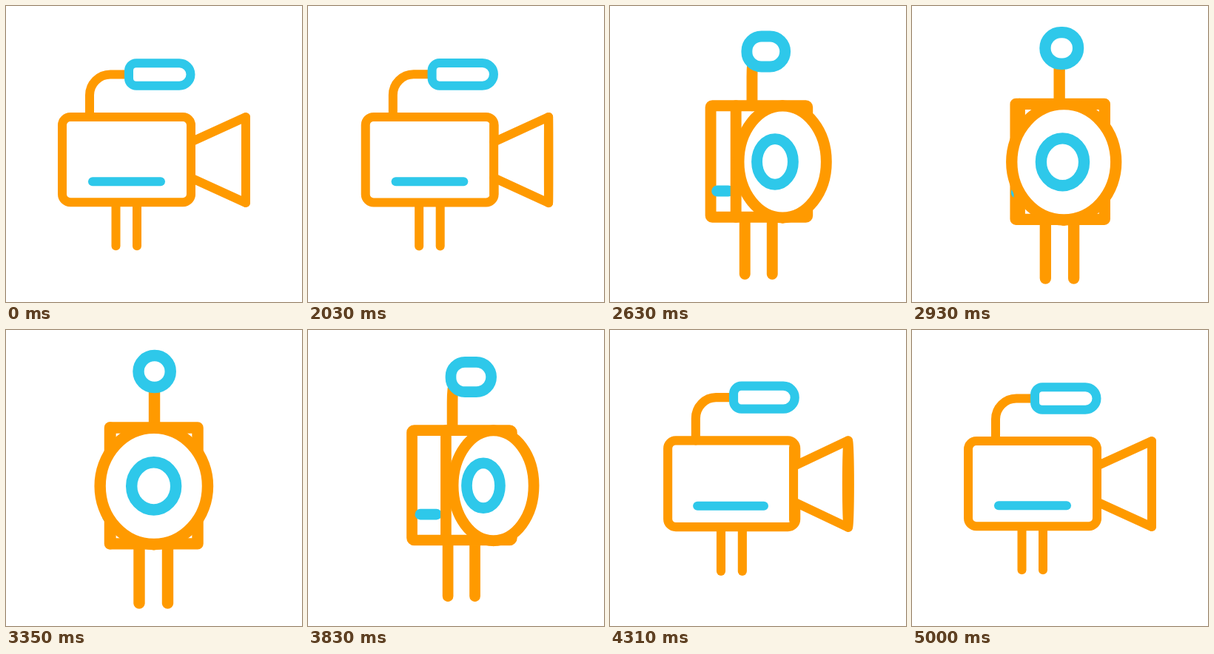
An HTML page with a canvas for the animation above (5.03 s loop, 400 px wide and 400 px high).

```html
<!DOCTYPE html>
<html lang="en">
<head>
<meta charset="utf-8">
<title>Turning camera</title>
<style>
  html, body { margin: 0; width: 100%; height: 100%; overflow: hidden; background: #fff; }
  canvas { display: block; width: 400px; height: 400px; }
</style>
</head>
<body>
<canvas id="stage" width="400" height="400"></canvas>
<script>
const ctx = document.getElementById('stage').getContext('2d');
const ORANGE = '#ff9a00', BLUE = '#2ec8ea';
const LOOP = 5030, HOLD = 2030, STEP = 30, TURN = 3350;

// Time in ms and amount of turn: 0 is the side view, 1 the front view.
const KEYS = [
  [2000, 0], [2030, 0.005], [2150, 0.13], [2250, 0.34], [2350, 0.53], [2450, 0.675],
  [2540, 0.78], [2630, 0.85], [2770, 0.928], [2920, 0.976], [3080, 0.998],
  [3220, 1.008], [3350, 1.002], [3480, 0.985], [3620, 0.93], [3730, 0.872], [3830, 0.795],
  [3950, 0.62], [4060, 0.395], [4160, 0.2], [4230, 0.105], [4310, 0.036],
  [4400, -0.018], [4520, -0.045], [4640, -0.037], [4760, -0.02], [4900, -0.005], [5000, 0]
];

const lerp = (a, b, p) => a + (b - a) * p;

function slope(i) {
  const a = KEYS[Math.max(0, i - 1)], b = KEYS[Math.min(KEYS.length - 1, i + 1)];
  return (b[1] - a[1]) / (b[0] - a[0]);
}

function turnAt(t) {
  if (t < HOLD || t >= 5000) return 0;
  let i = 0;
  while (KEYS[i + 1][0] <= t) i++;
  const [t0, v0] = KEYS[i], [t1, v1] = KEYS[i + 1];
  const d = t1 - t0, u = (t - t0) / d, w = 1 - u;
  return w * w * (1 + 2 * u) * v0 + u * u * (3 - 2 * u) * v1
    + d * u * w * (w * slope(i) - u * slope(i + 1));
}

// Sideways swing, different on the way out and back.
function swing(p, back) {
  if (p <= 0) return 50 * p;
  return back ? 19 * Math.sin(Math.PI * p ** 1.3) : 20 * Math.sin(Math.PI * p ** 0.7);
}

function stroke(color, fill) {
  if (fill) {
    ctx.fillStyle = '#fff';
    ctx.fill();
  }
  ctx.strokeStyle = color;
  ctx.stroke();
}

function line(color, ...pts) {
  ctx.beginPath();
  for (let i = 0; i < pts.length; i += 2) ctx.lineTo(pts[i], pts[i + 1]);
  stroke(color);
}

function box(color, x0, y0, x1, y1, radii, fill) {
  ctx.beginPath();
  ctx.roundRect(x0, y0, x1 - x0, y1 - y0, radii);
  stroke(color, fill);
}

function oval(x, y, rx, ry) {
  ctx.beginPath();
  ctx.ellipse(x, y, Math.max(0.01, rx), ry, 0, 0, Math.PI * 2);
}

function drawMic(p) {
  const x = lerp(113, 200.3, p), bend = 28 * (1 - p);
  const left = lerp(166, 184.6, p), right = lerp(249.5, 216.5, p);
  const shift = 1.7 * p, k = 0.45;
  ctx.beginPath();
  ctx.moveTo(x, 150);
  ctx.lineTo(x, 120.5);
  ctx.bezierCurveTo(x, 120.5 - 28 * (1 - k), x + bend * k, 92.5, x + bend, 92.5);
  ctx.lineTo(lerp(164, 200.3, p), 92.5);
  stroke(ORANGE);
  const r = Math.min(16, lerp(10, 16, p)), e = 15.3 + 0.5 * p;
  box(BLUE, left, 92.5 + shift - e, right, 92.5 + shift + e, [r, e, e, r], true);
}

function drawBody(p) {
  const mid = 200 - 37 * (1 - p), half = 87 - 43.5 * p;
  const left = mid - half, right = mid + half, bar = left + 174 * (1 - p);
  const neck = (bar + right) / 2, mouth = lerp(324, 200.2, p), cy = 208;

  for (const [a, b] of [[148.5, 185.3], [177, 213.6]]) {
    const x = lerp(a, b, p);
    line(ORANGE, x, 266, x, 324.3);
  }
  box(ORANGE, left, 150, right, 265.3, 11 * Math.min(1, Math.max(0, 1 - p)));

  const y = 237.2 + 1.3 * p;
  line(BLUE, lerp(117, 157, p), y, lerp(209, 154.5, p), y);

  // Horn: cone sides first, then the open end with the lens inside.
  ctx.beginPath();
  ctx.moveTo(mouth, cy - 58);
  ctx.lineTo(neck, cy - 24.2);
  ctx.lineTo(neck, cy + 24.2);
  ctx.lineTo(mouth, cy + 58);
  ctx.fillStyle = '#fff';
  ctx.fill();
  line(ORANGE, neck, cy - 24.2, mouth, cy - 58);
  line(ORANGE, neck, cy + 24.2, mouth, cy + 58);
  const inset = 11 * Math.max(0, 1 - p * 4);
  line(ORANGE, bar, 150 + inset, bar, 265.3 - inset);

  const rx = 53.3 * p;
  oval(mouth, cy, rx, 57.8);
  ctx.fillStyle = '#fff';
  ctx.fill();
  if (p > 0.05) {
    ctx.save();
    ctx.clip();
    oval(lerp(273, 200, p), cy, 22 * p, 23.6);
    stroke(BLUE);
    ctx.restore();
  }
  oval(mouth, cy, rx, 57.8);
  stroke(ORANGE);
}

function draw(t) {
  const p = turnAt(t), scale = 1 + 0.36 * p;
  ctx.setTransform(1, 0, 0, 1, 0, 0);
  ctx.fillStyle = '#fff';
  ctx.fillRect(0, 0, 400, 400);
  ctx.translate(200, 200);
  ctx.scale(scale, scale);
  ctx.translate(swing(p, t > TURN) - 200, -200);
  ctx.lineWidth = (12 + 3.4 * p) / scale;
  ctx.lineCap = ctx.lineJoin = 'round';
  drawMic(p);
  drawBody(p);
}

const start = performance.now();
function tick() {
  const t = (performance.now() - start) % LOOP;
  draw(t < HOLD ? 0 : HOLD + Math.floor((t - HOLD) / STEP) * STEP);
  requestAnimationFrame(tick);
}
tick();
</script>
</body>
</html>
```
